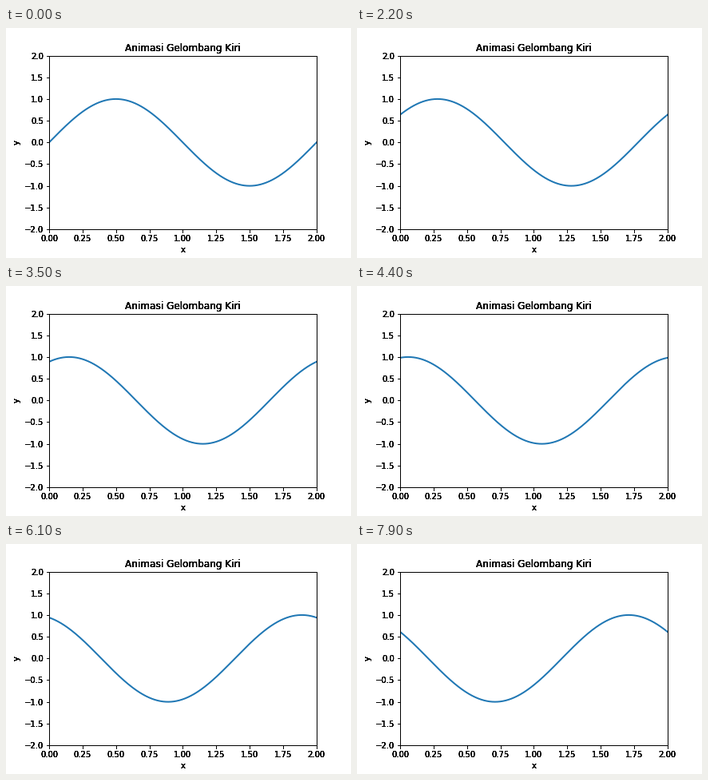
Animation, 432 px wide and 288 px high, one loop 8 s. Source, as a matplotlib script:

```python
import numpy as np
import matplotlib.pyplot as plt
from matplotlib.animation import FuncAnimation

FRAMES = 80
INTERVAL = 100
SHIFT = 0.01     # leftward travel per step, in x units
LAYERS = 5       # stacked axes give the heavy, hard-edged lettering

plt.rcParams["font.family"] = "DejaVu Sans"

fig = plt.figure(figsize=(6, 4), dpi=72, facecolor="white")


def add_layer(index):
    ax = fig.add_axes([0.125, 0.125, 0.775, 0.755], label=f"layer{index}")
    ax.set(xlim=(0, 2), ylim=(-2, 2), xlabel="x", ylabel="y",
           title="Animasi Gelombang Kiri")
    ax.set_xticks(np.arange(0, 2.01, 0.25))
    ax.set_yticks(np.arange(-2, 2.01, 0.5))
    if index:
        ax.patch.set_visible(False)
    return ax


axes = [add_layer(i) for i in range(LAYERS)]
x = np.linspace(0, 2, 1000)
line, = axes[0].plot([], [], lw=2, color="#1f77b4")


def update(i):
    line.set_data(x, np.sin(np.pi * (x + SHIFT * i)))
    return line,


anim = FuncAnimation(fig, update, frames=FRAMES, interval=INTERVAL,
                     repeat=True, repeat_delay=0, blit=False)
plt.show()
```
